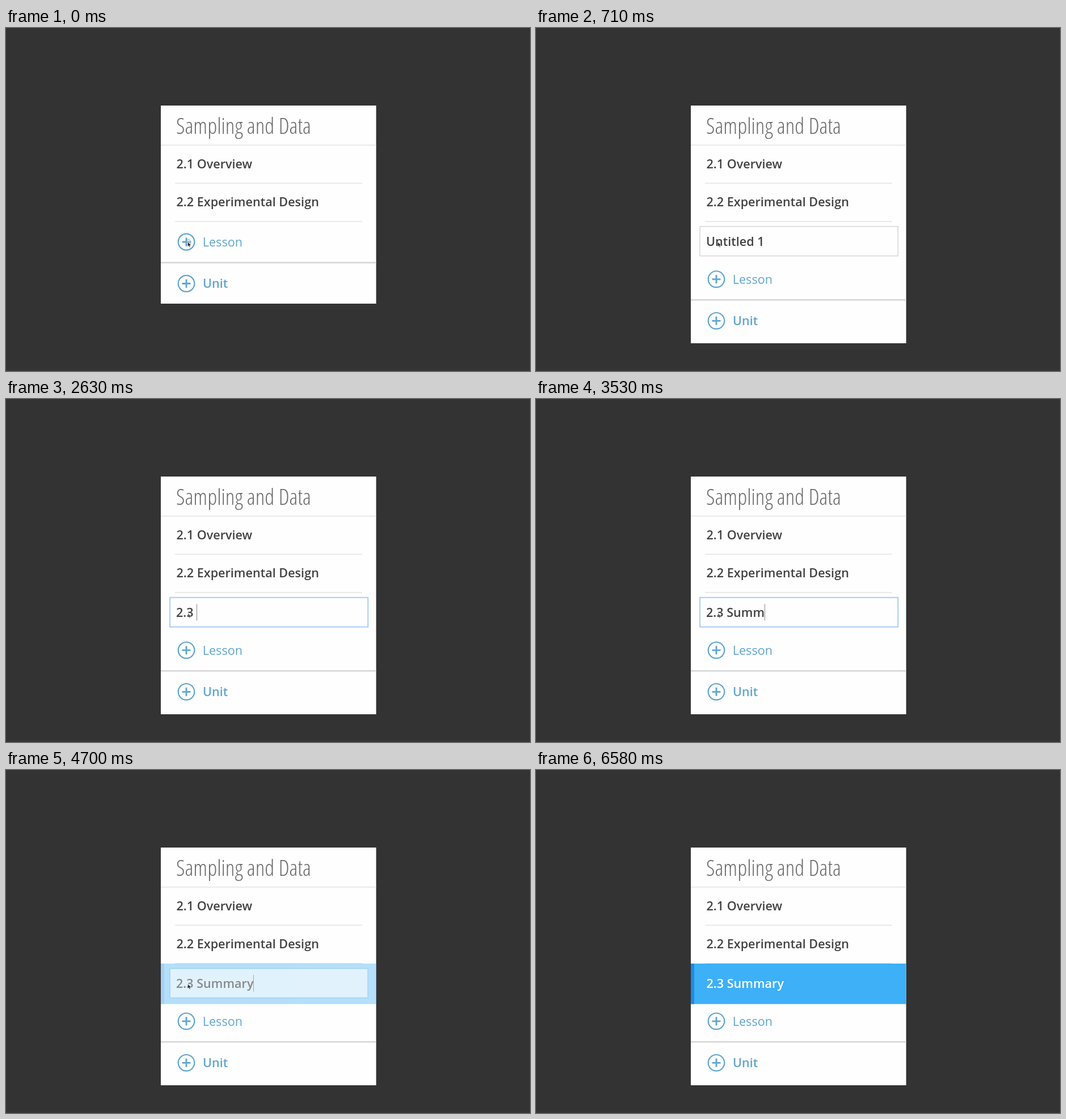
Write an HTML page that moves like this. It is 924 by 606 pixels and loops after 7.21 s.

```html
<!DOCTYPE html>
<html lang="en">
<head>
<meta charset="utf-8">
<title>Adding a lesson</title>
<style>
  html, body { margin: 0; width: 100%; height: 100%; overflow: hidden; background: #333; }
  svg { display: block; width: 924px; height: 606px; }
  text { font: 600 21.6px "Open Sans", sans-serif; fill: #424242; white-space: pre; }
  .title { font: 300 39px "Open Sans Condensed Light", "Open Sans", sans-serif; font-stretch: 75%; fill: #6a6a6a; }
  .add text { fill: #5fa5cf; }
  .add .lesson { font-weight: 400; }
  .add use { stroke: #5fa5cf; fill: none; }
</style>
</head>
<body>
<svg viewBox="0 0 924 606">
  <defs>
    <g id="plus">
      <circle r="14.3" stroke-width="2.2"/>
      <path d="M-7.5 0H7.5M0-7.5V7.5" stroke-width="2.8"/>
    </g>
    <clipPath id="slot"><rect id="slotRect" x="273" y="342" width="380"/></clipPath>
  </defs>
  <rect width="924" height="606" fill="#333"/>
  <rect y="603" width="924" height="3" fill="#393536"/>
  <rect id="card" x="273" y="137" width="379.7" fill="#fefefe"/>

  <text class="title" x="300" y="187">Sampling and Data</text>
  <text x="300.5" y="248">2.1 Overview</text>
  <text x="300.5" y="315.3">2.2 Experimental Design</text>
  <g fill="#e5e5e5">
    <rect x="273" y="206" width="379.7" height="1.6"/>
    <rect x="298" y="273.5" width="330" height="1.6"/>
    <rect x="298" y="341" width="330" height="1.6"/>
  </g>

  <g id="lower" class="add">
    <use href="#plus" x="318" y="378"/>
    <text class="lesson" x="346.8" y="386">Lesson</text>
    <rect x="273" y="413.3" width="379.7" height="2.5" fill="#d5d5d5"/>
    <use href="#plus" x="318" y="451.5"/>
    <text x="347" y="459.3">Unit</text>
  </g>

  <g id="band">
    <rect x="273" y="342" width="379.7" height="71.5" fill="#3eb0f7"/>
    <rect x="273" y="342" width="6" height="71.5" fill="#1e8be3"/>
    <text x="300.5" y="385" style="fill:#fff">2.3 Summary</text>
  </g>

  <g id="field" clip-path="url(#slot)">
    <rect id="box" x="289" y="350.7" width="349.3" height="52" fill="#fefefe"/>
    <text id="entry" x="300" y="385"></text>
    <rect id="caret" y="362" width="1" height="29.5" fill="#8a8a8a"/>
  </g>

  <circle id="ring" cx="321.5" cy="378.5" r="4.6" fill="#fff" fill-opacity=".15" stroke="#6c8fa5" stroke-width=".9"/>
  <path id="cursor" d="M0 0V8.2L2 6.5 3.3 9.5 4.7 8.9 3.4 6H6Z" fill="#222" stroke="#fff" stroke-width=".5"/>
</svg>
<script>
const LOOP = 7210;
const $ = id => document.getElementById(id);
const set = (id, attrs) => {
  for (const name in attrs) $(id).setAttribute(name, attrs[name]);
};
const show = (id, on) => { $(id).style.display = on ? "" : "none"; };

// Each track lists [start time, value]; values hold until the next step.
const at = (track, t) => track.reduce((value, step) => t >= step[0] ? step[1] : value, track[0][1]);

const opening = [[0, 0], [390, .15], [480, .45], [560, .743], [710, 1]];
const focus = [[0, 0], [1000, .5], [1110, 1]];
const selected = [[0, 0], [4700, .39], [4790, .8], [4910, 1]];
const pointer = [[0, [320.5, 378]], [6290, [552, 465]], [6390, [700, 520]], [6480, [912, 592]]];
const keyTimes = [2010, 2190, 2280, 2630, 2990, 3170, 3350, 3530, 3710, 3800, 4340];

const mix = (a, b, k) => `rgb(${a.map((v, i) => Math.round(v + (b[i] - v) * k))})`;

function draw(t) {
  const open = at(opening, t), focused = at(focus, t), chosen = at(selected, t);
  set("card", { height: 350 + 70 * open });
  set("lower", { transform: `translate(0 ${65.8 * open})` });
  set("slotRect", { height: 71 * open });
  set("band", { opacity: chosen });

  const typed = keyTimes.filter(k => t >= k).length;
  $("entry").textContent = typed ? "2.3 Summary".slice(0, typed) : open === 1 ? "Untitled 1" : "";
  set("field", { opacity: 1 - chosen });
  set("box", {
    stroke: mix([208, 208, 208], [170, 206, 242], focused),
    "stroke-width": 1.3 + .7 * focused
  });
  show("caret", typed);
  if (typed) set("caret", { x: Math.round(300 + $("entry").getComputedTextLength()) });

  show("ring", t < 90);
  show("cursor", t < 6580);
  set("cursor", {
    transform: `translate(${at(pointer, t)})`,
    opacity: t >= 1470 && t < 4700 ? .65 : 1
  });
}

const start = performance.now();
function frame() {
  draw((performance.now() - start) % LOOP);
  requestAnimationFrame(frame);
}
draw(0);
requestAnimationFrame(frame);
</script>
</body>
</html>
```
